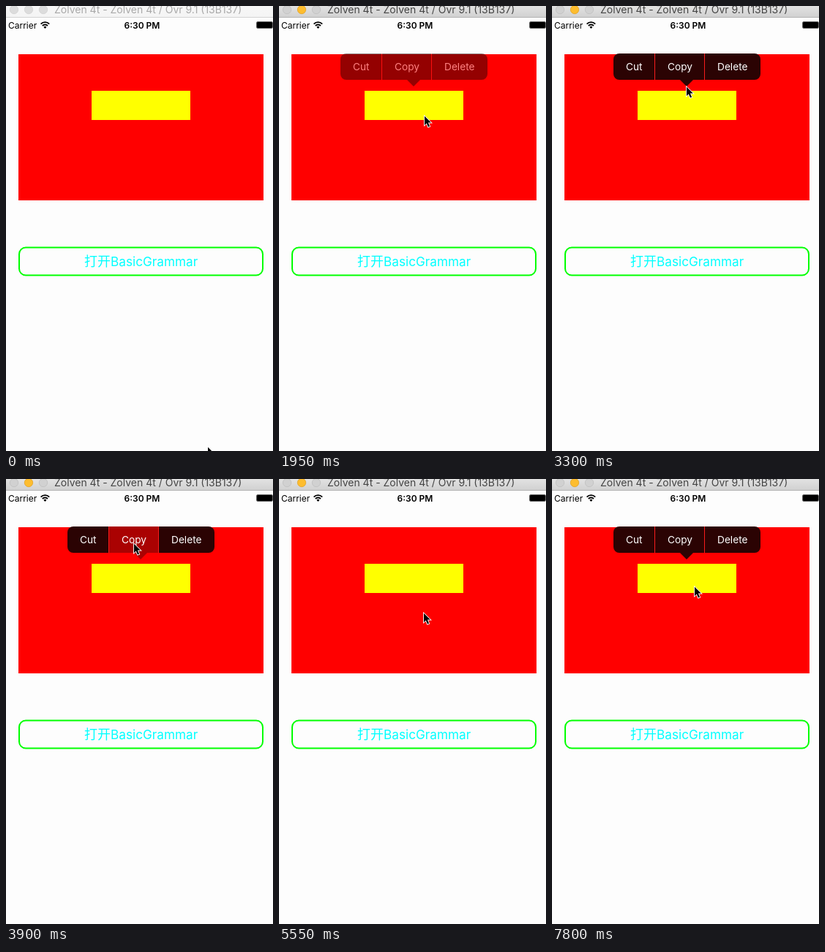
These frames come from a looping animation (365 px wide and 609 px high, 8000 ms). An HTML page:

```html
<!DOCTYPE html>
<html lang="en">
<head>
<meta charset="utf-8">
<title>Popup menu demo</title>
<style>
  html, body { margin: 0; width: 100%; height: 100%; overflow: hidden; background: #fdfdfd; }
  svg { display: block; width: 365px; height: 609px; font-family: Inter, "Liberation Sans", sans-serif; }
  text { white-space: pre; }
  .bar { fill: url(#barOff); }
  .edge { fill: #d3d3d3; }
  .dot { fill: #dcdcdc; stroke: #d2d2d2; stroke-width: .8; }
  .title { fill: #a8a8a8; font-size: 14px; }
  .active .bar { fill: url(#barOn); }
  .active .edge { fill: #b3b3b3; }
  .active .dot { fill: #d1d1d1; stroke: #bfbfbf; }
  .active .mid { fill: #fdbd2f; stroke: #e2a325; }
  .active .title { fill: #444; }
  .status { font-size: 12px; fill: #000; }
  .cjk { font-family: "Noto Sans CJK SC", "Noto Sans CJK", sans-serif; font-size: 18px; }
  .panel, .item { fill: #2b0303; }
  .picked .item { fill: #aa0202; }
  .label { font-size: 13.7px; fill: #fff; }
</style>
</head>
<body>
<svg id="stage" viewBox="0 0 365 609">
  <defs>
    <linearGradient id="barOff" x2="0" y2="1">
      <stop stop-color="#f7f7f7"/><stop offset="1" stop-color="#f4f4f4"/>
    </linearGradient>
    <linearGradient id="barOn" x2="0" y2="1">
      <stop stop-color="#e2e2e2"/><stop offset="1" stop-color="#d1d1d1"/>
    </linearGradient>
  </defs>
  <rect width="365" height="609" fill="#fdfdfd"/>

  <rect class="bar" width="365" height="15"/>
  <rect class="edge" y="15" width="365" height="1"/>
  <circle class="dot" cx="11" cy="5" r="5.7"/>
  <circle class="dot mid" cx="31" cy="5" r="5.7"/>
  <circle class="dot" cx="51" cy="5" r="5.7"/>
  <text class="title" x="66" y="10">Zolven 4t - Zolven 4t / Ovr 9.1 (13B137)</text>

  <text class="status" x="3" y="31">Carrier</text>
  <g fill="none" stroke="#000" stroke-width="1.8">
    <path d="M47.6 24.6a8.2 8.2 0 0 1 11.6 0"/>
    <path d="M49.8 27a5.1 5.1 0 0 1 7.2 0"/>
    <path d="M53.4 31l-2 -2.2a2.9 2.9 0 0 1 4 0z" fill="#000" stroke="none"/>
  </g>
  <text class="status" x="186" y="31" text-anchor="middle" font-weight="600">6:30 PM</text>
  <rect x="342.5" y="21.5" width="22" height="9" rx="1.5" fill="none" stroke="#666"/>
  <rect x="343" y="22" width="21" height="8" rx="1"/>

  <rect x="17" y="66" width="335" height="200" fill="#f00"/>
  <rect x="117" y="116" width="135" height="40" fill="#ff0"/>

  <rect x="18" y="330.5" width="333" height="38" rx="9" fill="none" stroke="#0f0" stroke-width="2"/>
  <g fill="#0ff">
    <text class="cjk" x="107" y="356">打开</text>
    <text x="143" y="356" font-size="17.2">BasicGrammar</text>
  </g>

  <g id="menu">
    <path class="panel" d="M141 65H92a8 8 0 0 0 -8 8V93a8 8 0 0 0 8 8H141z"/>
    <path class="panel" d="M208 65H277a8 8 0 0 1 8 8V93a8 8 0 0 1 -8 8H208z"/>
    <path class="item" d="M141 65H208V101H193L184 110L175 101H141z"/>
    <path d="M140.5 65V101M208.5 65V101" stroke="#f81c1c"/>
    <text class="label" x="101" y="88">Cut</text>
    <text class="label" x="158" y="88">Copy</text>
    <text class="label" x="226" y="88">Delete</text>
  </g>

  <path id="cursor" d="M1 1.8V14L3.8 11.4L6 16.6L8.1 15.7L5.9 10.6H9.8z"
        fill="#000" stroke="#fff" stroke-width="1.8" paint-order="stroke"/>
</svg>
<script>
  const LOOP = 8000, STEP = 150;
  const byId = id => document.getElementById(id);
  const stage = byId('stage'), menu = byId('menu'), cursor = byId('cursor');

  const clamp = v => Math.min(1, Math.max(0, v));
  const ease = k => k * k * (3 - 2 * k);

  const home = { x: 275, y: 602 };
  const moves = [
    { from: 0, to: 1050, x: 176, y: 149 },
    { from: 1050, to: 1200, x: 200, y: 142 },
    { from: 1200, to: 1500, x: 198, y: 149 },
    { from: 2550, to: 2700, x: 197, y: 143 },
    { from: 2700, to: 3750, x: 174, y: 87 },
    { from: 4500, to: 4800, x: 212, y: 190 },
    { from: 5250, to: 6450, x: 118, y: 138 },
    { from: 6750, to: 7050, x: 194, y: 146 }
  ];

  // each move carries the pointer on from wherever the last one left it
  function tipAt(t) {
    let { x, y } = home;
    for (const m of moves) {
      const k = ease(clamp((t - m.from) / (m.to - m.from)));
      x += (m.x - x) * k;
      y += (m.y - y) * k;
    }
    return [Math.round(x), Math.round(y)];
  }

  // half opacity for one step at either end
  const shown = (t, on, off) =>
    clamp(Math.min(t + STEP - on, off - t) / (2 * STEP));

  function draw(time) {
    const t = Math.floor(time / STEP) * STEP;
    const [x, y] = tipAt(t);
    cursor.setAttribute('transform', `translate(${x} ${y})`);
    menu.setAttribute('opacity', shown(t, 1950, 4500) + shown(t, 7650, Infinity));
    stage.classList.toggle('picked', t >= 3900 && t < 4500);
    stage.classList.toggle('active', t >= 1350);
  }

  const start = performance.now();
  function tick() {
    draw((performance.now() - start) % LOOP);
    requestAnimationFrame(tick);
  }
  tick();
</script>
</body>
</html>
```
